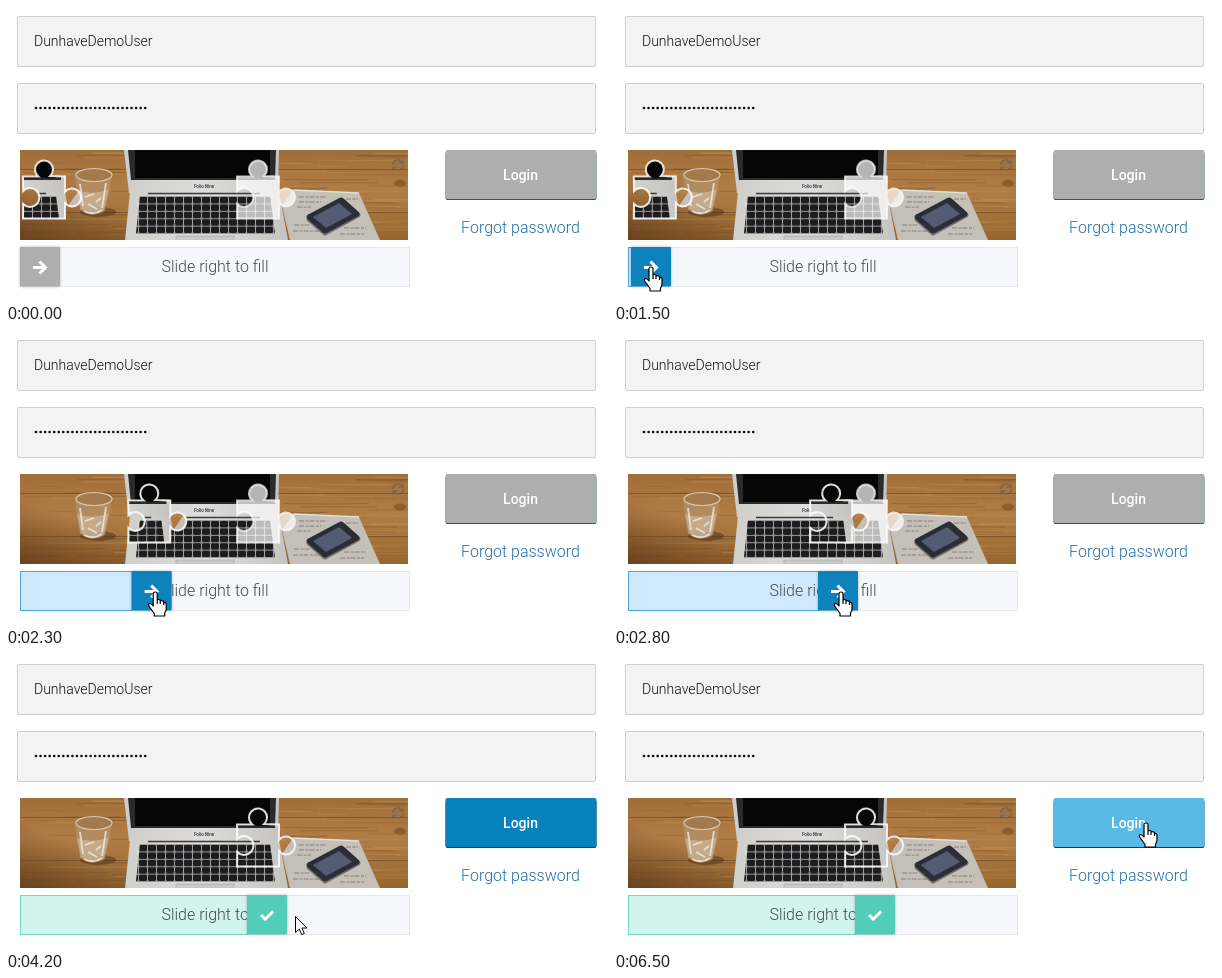
An HTML page that plays this animation: 602x296 px, repeating every 6800 ms.

```html
<!DOCTYPE html>
<html lang="en">
<head>
<meta charset="utf-8">
<title>Slide to verify login</title>
<style>
  html, body { margin: 0; width: 100%; height: 100%; overflow: hidden; background: #fff; }
  svg { display: block; width: 100vw; height: 100vh; }
  text { font-family: Roboto, Arial, sans-serif; font-weight: 300; }
  .field { fill: #f3f3f3; stroke: #cfcfcf; }
  .icon { fill: none; stroke: #fff; stroke-width: 3; stroke-linejoin: miter; }
  .cursor { fill: #fff; stroke: #000; stroke-linejoin: round; }
</style>
</head>
<body>
<svg viewBox="0 0 602 296" xmlns="http://www.w3.org/2000/svg">
  <defs>
    <linearGradient id="wood" x1="0" y1="0" x2="0" y2="1">
      <stop offset="0" stop-color="#a06e39"/>
      <stop offset=".45" stop-color="#b17d46"/>
      <stop offset="1" stop-color="#96662f"/>
    </linearGradient>
    <linearGradient id="shade" x1="0" y1="1" x2=".5" y2="0">
      <stop offset="0" stop-color="#4a2c12" stop-opacity=".6"/>
      <stop offset=".6" stop-color="#4a2c12" stop-opacity="0"/>
    </linearGradient>
    <linearGradient id="metal" x1="0" y1="0" x2="1" y2="0">
      <stop offset="0" stop-color="#cfcecb"/>
      <stop offset=".5" stop-color="#dedddb"/>
      <stop offset="1" stop-color="#c6c4c1"/>
    </linearGradient>
    <pattern id="keys" x="133" y="191" width="9" height="7.4" patternUnits="userSpaceOnUse">
      <rect width="8" height="6.4" rx="1" fill="#1d1d1f"/>
    </pattern>
    <filter id="shadow" x="-20%" y="-20%" width="140%" height="140%">
      <feDropShadow dx="0" dy="0" stdDeviation="1.5" flood-color="#000" flood-opacity=".3"/>
    </filter>
    <clipPath id="frame"><rect x="14" y="144" width="388" height="90"/></clipPath>
    <clipPath id="jigsaw"><path class="piece"/></clipPath>
  </defs>

  <rect class="field" x="11.5" y="10.5" width="578" height="50" rx="1.5"/>
  <rect class="field" x="11.5" y="77.5" width="578" height="50" rx="1.5"/>
  <text x="28" y="40" font-size="14" fill="#111">DunhaveDemoUser</text>
  <path d="M30 102H141" stroke="#111" stroke-width="2.7" stroke-linecap="round" stroke-dasharray="0 4.55"/>

  <g id="photo" clip-path="url(#frame)">
    <rect x="14" y="144" width="388" height="90" fill="url(#wood)"/>
    <g id="grain" fill="none"></g>
    <rect x="14" y="144" width="110" height="90" fill="url(#shade)"/>
    <path d="M14 163.5H402M14 206.5H402" stroke="#6b4320" stroke-opacity=".6"/>
    <ellipse cx="394" cy="177" rx="6" ry="3.5" fill="#7a4d24" opacity=".6"/>

    <ellipse cx="92" cy="206" rx="18" ry="5" fill="#4b2f16" opacity=".5"/>
    <path d="M69 170L74 204Q86 213 99 205L106 169Z" fill="#b3936c" opacity=".7"/>
    <path d="M71 184L75 203Q86 212 98 204L103 183Q87 190 71 184Z" fill="#c9b59b" opacity=".75"/>
    <ellipse cx="88" cy="169" rx="18" ry="6.5" fill="#a37a4c" stroke="#d9c8b2" stroke-width="1.2"/>
    <path d="M74 178L77 200M100 177L96 202M78 205Q87 210 96 204M82 198L91 203M79 191L88 188M90 196L95 192" stroke="#f1eae0" fill="none" stroke-width="1.8" opacity=".8"/>

    <path d="M119 234L124 186H273L282 234Z" fill="url(#metal)"/>
    <path d="M118 144H273L272 187H123Z" fill="url(#metal)"/>
    <path d="M122 144H270L269 174H125Z" fill="#2a2a2b"/>
    <path d="M129 144H264V172H129Z" fill="#060606"/>
    <text x="198" y="182" font-size="4.5" text-anchor="middle" fill="#333" style="font-weight:500">Folio Nine</text>
    <path d="M142 187.5H254" stroke="#3a3a3b" stroke-width="1.6"/>
    <path id="deck" d="M134 190H264L269 228H130Z" fill="#a09f9d"/>
    <use href="#deck" style="fill:url(#keys)"/>
    <path d="M134 190H264L269 228H130Z" fill="url(#keys)"/>
    <path d="M170 234V230H228V234" fill="#c9c8c5" stroke="#aaa" stroke-width=".7"/>

    <path d="M287 184L353 187L374 234H284L276 200Z" fill="#c4bfb7"/>
    <path d="M287 184L353 187" stroke="#e2ded8" stroke-width="1.5"/>
    <path d="M293 191h28M293 196h22M291 201h14M340 193h12M288 219h16M287 225h26M338 222h22M334 228h24" stroke="#85817b" stroke-dasharray="5 1.5 3 1"/>
    <path d="M303 213L337 195L352 209L319 227Z" fill="#77726c" stroke="#77726c" stroke-width="5" stroke-linejoin="round"/>
    <path d="M303 211L335 194L351 208L319 225Z" fill="#2a2d36" stroke="#2a2d36" stroke-width="5" stroke-linejoin="round"/>
    <path d="M307 211L333 197L346 208L320 222Z" fill="#535c72"/>
  </g>
  <path d="M386.500 159A5.500 5.500 0 0 1 396.500 156.500M397.500 159A5.500 5.500 0 0 1 387.500 161.500M397 153V157H393M387 165V161H391" fill="none" stroke="#6e6455" stroke-width="1.600" opacity=".8"/>

  <path id="hole" class="piece" fill="#fff" fill-opacity=".7" stroke="#fff" stroke-opacity=".7" stroke-width="2"/>
  <g id="block">
    <g clip-path="url(#jigsaw)"><use href="#photo"/></g>
    <path class="piece" fill="none" stroke="#fff" stroke-opacity=".85" stroke-width="2"/>
  </g>

  <rect x="14.5" y="241.5" width="389" height="39" fill="#f5f7fb" stroke="#e4e7eb"/>
  <rect id="mask" x="14.5" y="241.5" height="39" stroke-opacity=".75"/>
  <text x="209" y="266" font-size="16" text-anchor="middle" fill="#45494c">Slide right to fill</text>
  <g id="handle">
    <rect id="knob" x="14" y="241" width="40" height="39.5" rx="1" filter="url(#shadow)"/>
    <path id="arrow" class="icon" d="M27 261.5H39M33.5 255.5L39.5 261.5L33.5 267.500"/>
    <path id="check" class="icon" d="M28 261L32.200 265.200L40.200 257.200"/>
  </g>

  <rect id="edge" x="439.5" y="146" width="151" height="48" rx="2"/>
  <rect id="login" x="439.5" y="144" width="151" height="49" rx="2"/>
  <text x="514.5" y="174" font-size="14" text-anchor="middle" fill="#fff" style="font-weight:500">Login</text>
  <text x="514.5" y="227" font-size="16" text-anchor="middle" fill="#1f6fa8">Forgot password</text>

  <path id="pointer" class="cursor" d="M.5 .5V16.5L4.300 13L6.700 18.600L9.300 17.500L6.900 12H12Z"/>
  <path id="hand" class="cursor" stroke-width="1.2" d="M-2 1.5Q-2 0 0 0T2 1.5V8Q3 7 5 8V9Q7 8 8.5 9.5V10.5Q11 10 11 12.5V17Q11 19 9.5 21V24H-1V21.5L-6 14.5Q-7.5 12 -5.5 11.5Q-4 11.5 -2 14Z M2 8V12M5 9V12M8.5 10.5V13"/>
</svg>
<script>
const LOOP = 6800, STEP = 100;
const RELEASE = 3700, KNOB_HOVER = 600, LOGIN_HOVER = 5700;
const GREY = [174, 174, 174], BLUE = [8, 130, 188], SKY = [89, 185, 231], TEAL = [82, 204, 186];
const el = Object.fromEntries([...document.querySelectorAll('[id]')].map(n => [n.id, n]));

// [time, x, y] of the pointer tip
const route = [
  [200, 66, 300], [500, 46, 277], [800, 36, 259], [900, 35, 257], [1200, 36, 259],
  [1500, 37, 261], [1900, 87, 262], [2800, 227, 262], [3100, 252, 262], [3500, 264, 262],
  [3700, 264, 262], [4200, 289, 262], [4500, 308, 262], [5000, 388, 249],
  [5500, 446, 199], [5800, 480, 182], [6300, 532, 169]
];
// [time, handle offset]
const slide = [[1400, 0], [1500, 3], [1900, 49], [2800, 190], [3100, 215], [3500, 227]];

const clamp = v => Math.min(1, Math.max(0, v));
const ramp = (t, start, span = 200) => clamp((t - start + STEP) / span);
const mix = (a, b, k) => a.map((v, i) => v + (b[i] - v) * k);
const rgb = c => `rgb(${c.map(Math.round)})`;
const set = (node, attrs) => { for (const k in attrs) node.setAttribute(k, attrs[k]); };
const show = (node, on) => set(node, { visibility: on ? 'visible' : 'hidden' });

function along(keys, t) {
  const i = keys.findIndex(k => k[0] > t);
  if (i === 0) return keys[0].slice(1);
  if (i < 0) return keys[keys.length - 1].slice(1);
  const a = keys[i - 1], b = keys[i];
  return mix(a.slice(1), b.slice(1), (t - a[0]) / (b[0] - a[0]));
}

// Jigsaw outline: bumps on top and right, a notch on the left
function jigsaw(x, y, size, r) {
  const dot = (cx, cy, a, rad) => `${cx + rad * Math.cos(a * Math.PI)} ${cy + rad * Math.sin(a * Math.PI)}`;
  const arc = (cx, cy, rad, from, to, sweep) =>
    `L${dot(cx, cy, from, rad)}A${rad} ${rad} 0 1 ${sweep} ${dot(cx, cy, to, rad)}`;
  const half = size / 2;
  return `M${x} ${y}` + arc(x + half, y - r + 2, r, 0.72, 2.26, 1) +
    `L${x + size} ${y}` + arc(x + size + r - 2, y + half, r, 1.21, 2.78, 1) +
    `L${x + size} ${y + size}H${x}` + arc(x + r - 2, y + half, r + 0.4, 2.76, 1.24, 0) + 'Z';
}

function drawGrain() {
  let seed = 7, out = '';
  const rand = () => (seed = seed * 16807 % 2147483647) / 2147483647;
  for (let i = 0; i < 90; i++) {
    const x = 14 + rand() * 370, y = 145 + rand() * 88, w = 25 + rand() * 70;
    const tone = rand() < 0.5 ? '#6f4621' : '#cf9c60';
    out += `<path d="M${x} ${y}q${w / 2} ${rand() * 3 - 1.5} ${w} 0" stroke="${tone}" stroke-opacity="${0.15 + rand() * 0.3}"/>`;
  }
  el.grain.innerHTML = out;
}

function render(t) {
  const [shift] = along(slide, t), [x, y] = along(route, t);
  const done = t >= RELEASE, active = t >= 1500;

  set(el.block, { transform: `translate(${shift * 330 / 350 - 214} 0)` });
  show(el.hole, !done);

  set(el.mask, {
    width: shift,
    fill: done ? '#d2f4ef' : '#d1e9ff',
    stroke: done ? '#52ccba' : '#1991da'
  });
  show(el.mask, active);
  set(el.handle, { transform: `translate(${shift} 0)` });
  set(el.knob, { fill: rgb(done ? mix(BLUE, TEAL, ramp(t, RELEASE)) : mix(GREY, BLUE, ramp(t, KNOB_HOVER))) });
  show(el.arrow, !done);
  show(el.check, done);

  const lit = mix(GREY, BLUE, ramp(t, RELEASE));
  set(el.login, { fill: rgb(mix(lit, SKY, ramp(t, LOGIN_HOVER))) });
  set(el.edge, { fill: done ? '#06405f' : '#0b6388' });

  const overKnob = t >= KNOB_HOVER && x < 14 + shift + 40 && y > 241;
  const hand = overKnob || t >= LOGIN_HOVER;
  const place = { transform: `translate(${x} ${y})` };
  set(el.pointer, place);
  set(el.hand, place);
  show(el.pointer, t >= 200 && !hand);
  show(el.hand, hand);
}

document.querySelectorAll('.piece').forEach(p => set(p, { d: jigsaw(231, 170.5, 42, 9) }));
drawGrain();

const begin = performance.now();
function tick() {
  const t = (performance.now() - begin) % LOOP;
  render(Math.floor(t / STEP) * STEP);
  requestAnimationFrame(tick);
}
tick();
</script>
</body>
</html>
```
